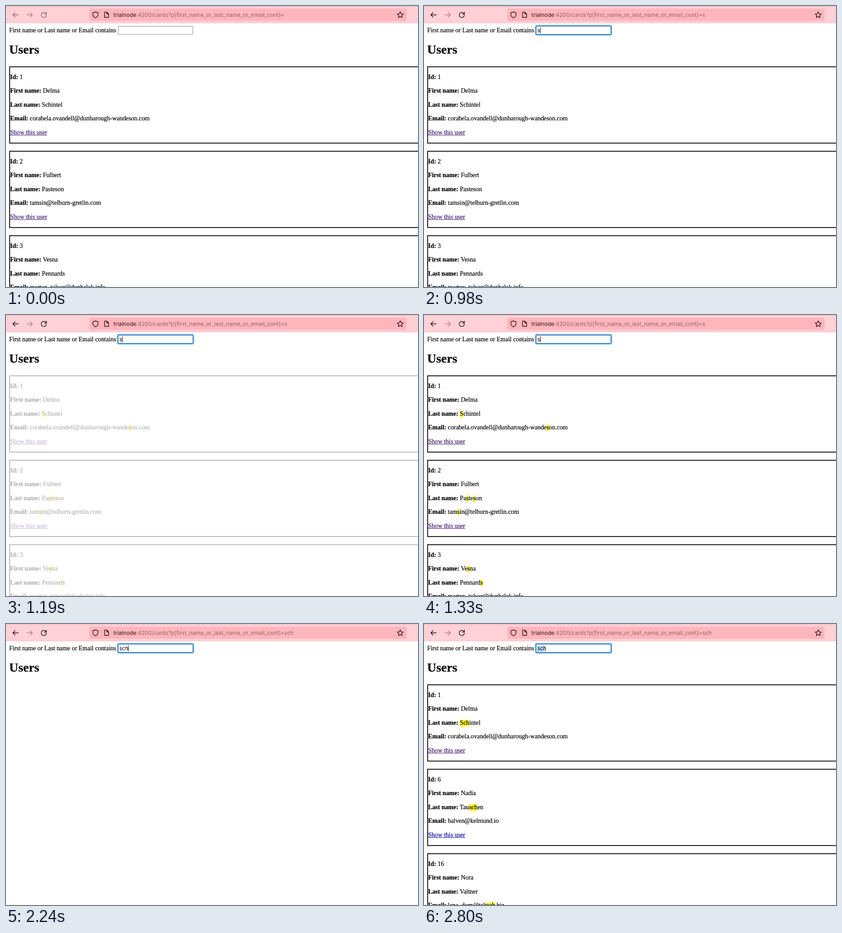
An HTML page for the animation above (2.94 s loop, 905 px wide and 619 px high).

```html
<!DOCTYPE html>
<html lang="en">
<head>
<meta charset="utf-8">
<title>User search</title>
<style>
html, body { margin: 0; width: 100%; height: 100%; overflow: hidden; background: #fff; }
body { position: relative; font: 13.8px/16px "Liberation Serif", Times, serif; color: #000; -webkit-text-stroke: .22px; }
body > *, .card, .card p { position: absolute; margin: 0; white-space: pre; }
#bar { left: 0; top: 0; }
#url { left: 236px; top: 12px; font: 12.1px/16px Inter, sans-serif; color: #95616a; -webkit-text-stroke: 0; }
#url b { font-weight: 400; color: #35141a; }
#label { left: 7px; top: 46px; }
h1 { left: 7px; top: 80px; font-size: 27.6px; line-height: 32px; }
#field { left: 246px; top: 44px; width: 163px; height: 17px; border: 1px solid #8a8a92; border-radius: 2px; }
#field.focus { border-color: #2a6fb5; box-shadow: 0 0 0 1px #2a6fb5, 0 0 1px 3px #b9ecfa; }
#typed { left: 249px; top: 47px; font: 11.5px/14px Inter, sans-serif; -webkit-text-stroke: 0; }
#typed.selected { background: #bad9fc; }
#caret { display: inline-block; width: 1px; height: 13px; background: #000; vertical-align: top; }
.card { left: 7px; width: 920px; height: 166px; border: 2px solid #222; box-shadow: 0 0 1px #0005, inset 0 0 1px #0005; }
.card p { left: 0; }
mark { background: linear-gradient(transparent 1px, #fffc30 1px); padding-bottom: 1px; color: inherit; }
u { color: #3d1a70; }
u.fresh { color: #0c0c98; }
</style>
</head>
<body>
<svg id="bar" width="905" height="38" fill="none" stroke="#2b1216" stroke-width="1.4" stroke-linecap="round" stroke-linejoin="round">
  <g stroke="none">
    <path fill="#ffd0d5" d="M0 0h905v37H0z"/>
    <path fill="#f6b4bc" d="M0 0h905v1H0z"/>
    <path fill="#efc3c8" d="M0 37h905v1H0z"/>
    <rect fill="#ffb5bc" x="183" y="6" width="697" height="27" rx="4"/>
  </g>
  <g id="nav">
    <path d="M27 19.5H15M20 14.5l-5 5 5 5"/>
    <path d="M87.6 16.3A5.7 5.7 0 1 0 88.7 20M88.7 13.5v4.2h-4.2"/>
  </g>
  <path stroke="#a98288" d="M46 19.5h12M53 14.5l5 5-5 5"/>
  <path d="M196.500 13l5.700 2v3.500c0 3.600-2.200 6.100-5.700 7.500-3.500-1.400-5.700-3.900-5.700-7.500V15z"/>
  <path d="M216.500 13.500h5l4 4v7.500h-9zM221.500 13.500v4h4"/>
  <path id="star"/>
</svg>
<div id="url"></div>
<div id="label">First name or Last name or Email contains</div>
<div id="field"></div>
<div id="typed"></div>
<h1>Users</h1>
<div id="list"></div>
<script>
const LOOP = 2940, STEP = 70;
const el = id => document.getElementById(id);

const delma = [1, 'Delma', 'Schintel', 'corabela.ovandell@dunbarough-wandeson.com'];
const nadia = [6, 'Nadia', 'Tauschen', 'halven@kelmund.io'];
const results = {
  '': [delma,
    [2, 'Fulbert', 'Pasteson', 'tamsin@telburn-gretlin.com'],
    [3, 'Vesna', 'Pennards', 'marten_tolver@dunhalek.info']],
  sc: [delma, nadia, [13, 'Ivo', 'Wascinet', 'georgann_trellan@barven.io']],
  sch: [delma, nadia, [16, 'Nora', 'Valtner', 'lena_dorn@taltsch.biz']]
};
results.s = results[''];

// Each step holds until the next: [time, value]
const queries = [[0, ''], [980, 's'], [1540, 'sc'], [2240, 'sch']];
const shownQueries = [[0, ''], [1120, 's'], [1540, 'sc'], [2240, 'sch']];
const opacities = [[0, 1], [1050, .5], [1120, 0], [1190, .3], [1260, .7], [1330, 1],
  [1540, 0], [1610, .5], [1680, 1], [2240, 0], [2380, .3], [2450, .7], [2520, 1]];
const valueAt = (steps, t) => steps.filter(s => s[0] <= t).pop()[1];

const names = ['Id', 'First name', 'Last name', 'Email'];

function card(user, index, query) {
  const highlight = (value, i) => query && i
    ? value.replace(new RegExp(query, 'gi'), '<mark>$&</mark>') : value;
  const rows = user.map((value, i) => `<b>${names[i]}:</b> ${highlight(value, i)}`);
  rows.push(`<u${user[0] > 3 ? ' class="fresh"' : ''}>Show this user</u>`);
  return `<div class="card" style="top:${133 + 186 * index}px">` +
    rows.map((row, i) => `<p style="top:${14 + 30.4 * i}px">${row}</p>`).join('') + '</div>';
}

let drawnQuery = null;
function draw(t) {
  const query = valueAt(queries, t), shown = valueAt(shownQueries, t);
  const focused = t >= 350;
  const caret = t >= 420 && t < 1470 || t >= 2240 && t < 2800;
  el('nav').setAttribute('stroke', focused ? '#1c0a0d' : '#8a676d');
  el('field').className = focused ? 'focus' : '';
  el('typed').className = t >= 2800 ? 'selected' : '';
  el('typed').innerHTML = query + (caret ? '<span id="caret"></span>' : '');
  el('url').innerHTML =
    `<b>trialnode</b>:4200/cards?p[first_name_or_last_name_or_email_cont]=${query}`;
  if (shown !== drawnQuery) {
    el('list').innerHTML = results[shown].map((user, i) => card(user, i, shown)).join('');
    drawnQuery = shown;
  }
  el('list').style.opacity = valueAt(opacities, t);
}

el('star').setAttribute('d', 'M' + Array.from({ length: 10 }, (_, i) => {
  const r = i % 2 ? 3.3 : 7, a = i * Math.PI / 5;
  return `${866 + r * Math.sin(a)} ${19.8 - r * Math.cos(a)}`;
}).join('L') + 'Z');

const start = performance.now();
let lastStep = -1;
function tick() {
  const t = (performance.now() - start) % LOOP;
  const step = Math.floor(t / STEP);
  if (step !== lastStep) draw(step * STEP);
  lastStep = step;
  requestAnimationFrame(tick);
}
tick();
</script>
</body>
</html>
```
